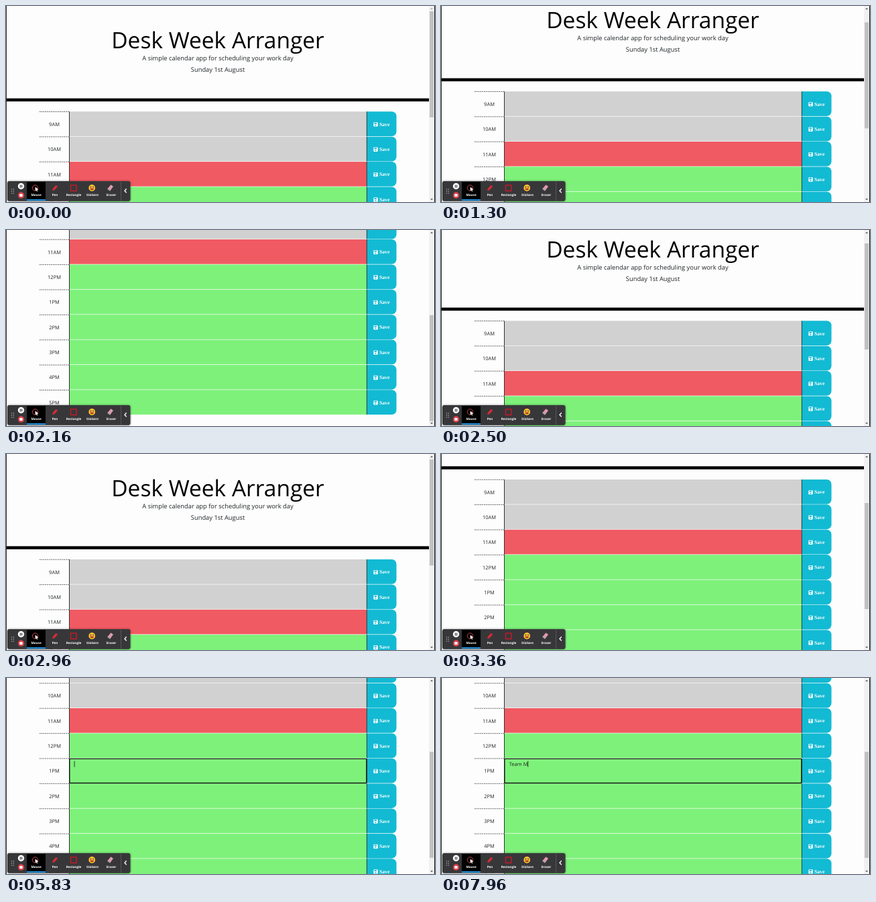
Recreate the animation shown at these times as an HTML page with a canvas. Size 640 px wide and 292 px high, loop 8 s.

```html
<!DOCTYPE html>
<html lang="en">
<head>
<meta charset="utf-8">
<title>Day planner</title>
<style>
html, body { margin: 0; width: 100%; height: 100%; overflow: hidden; background: #fdfdfd; }
canvas { display: block; width: 640px; height: 292px; }
</style>
</head>
<body>
<canvas id="stage" width="640" height="292"></canvas>
<script>
const ctx = document.getElementById('stage').getContext('2d');
ctx.textRendering = 'geometricPrecision';
const LOOP = 8000, FPS = 15;
const SANS = '"Open Sans", sans-serif';
const HOURS = ['9AM', '10AM', '11AM', '12PM', '1PM', '2PM', '3PM', '4PM', '5PM'];
const ROW_TOP = 157.3, ROW_H = 37.37, ACTIVE_ROW = 4;
const GREY = '#d1d1d1', RED = '#f05a62', GREEN = '#7ef17b', CYAN = '#13bad3';
const CLICKS = [[3830, 400], [4560, 460]];

const easeIn = p => p * p;
const easeOut = p => 1 - (1 - p) ** 3;
const linear = p => p;

// Each stop: time, scroll offset, easing used to reach it.
const SCROLL = [
  [0, 0, linear], [433, 0, linear], [1300, 30, easeIn],
  [1567, 182, linear], [2160, 218, easeOut], [2233, 218, linear],
  [2500, 22, linear], [3100, 0, easeOut], [3167, 0, linear],
  [3367, 119.5, linear], [3567, 187, easeOut], [LOOP, 187, linear]
];
const TYPING = [[6500, 'T'], [6700, 'Te'], [6900, 'Tea'], [7100, 'Team'], [7360, 'Team '], [7900, 'Team M']];

function scrollAt(t) {
  const i = Math.max(1, SCROLL.findIndex(stop => stop[0] >= t));
  const [t0, from] = SCROLL[i - 1], [t1, to, ease] = SCROLL[i];
  return from + (to - from) * ease((t - t0) / (t1 - t0));
}

function rect(x, y, w, h, color) {
  ctx.fillStyle = color;
  ctx.fillRect(x, y, w, h);
}

function rounded(x, y, w, h, radius, color) {
  ctx.fillStyle = color;
  ctx.beginPath();
  ctx.roundRect(x, y, w, h, radius);
  ctx.fill();
}

function disc(x, y, r, color) {
  ctx.fillStyle = color;
  ctx.beginPath();
  ctx.arc(x, y, r, 0, 7);
  ctx.fill();
}

function ring(x, y, r, width, color) {
  ctx.strokeStyle = color;
  ctx.lineWidth = width;
  ctx.beginPath();
  ctx.arc(x, y, r, 0, 7);
  ctx.stroke();
}

function poly(points, color) {
  ctx.fillStyle = color;
  ctx.beginPath();
  points.forEach(([x, y]) => ctx.lineTo(x, y));
  ctx.fill();
}

function text(str, x, y, font, color = '#212529', align = 'center') {
  ctx.font = font;
  ctx.fillStyle = color;
  ctx.textAlign = align;
  ctx.fillText(str, x, y);
}

function drawHeader() {
  text('Desk Week Arranger', 316, 63.2, `33.5px ${SANS}`, '#000');
  text('A simple calendar app for scheduling your work day', 316, 81.3, `9.35px ${SANS}`);
  text('Sunday 1st August', 316, 98.3, `9.35px ${SANS}`);
  rect(1, 137.6, 630, 4.6, '#000');
}

function drawSave(y) {
  rounded(538, y, 44.5, ROW_H - 0.6, [0, 7, 7, 0], CYAN);
  const cy = y + ROW_H / 2;
  rounded(548.3, cy - 2.8, 6.4, 6.4, 0.8, '#fff');
  rect(549.4, cy - 2, 3.6, 1.8, CYAN);
  disc(551.5, cy + 1.7, 1, CYAN);
  text('Save', 557, cy + 2.6, 'bold 7.7px "Liberation Serif", serif', '#fff', 'left');
}

function drawRow(hour, i) {
  const y = ROW_TOP + i * ROW_H;
  ctx.strokeStyle = '#222';
  ctx.lineWidth = 0.8;
  ctx.setLineDash([1.6, 1.2]);
  ctx.beginPath();
  ctx.moveTo(50, y + 0.2);
  ctx.lineTo(95, y + 0.2);
  ctx.stroke();
  ctx.setLineDash([]);
  text(hour, 72, y + 21.6, `7.5px ${SANS}`);
  rect(95, y, 443, ROW_H - 0.7, i < 2 ? GREY : i === 2 ? RED : GREEN);
  drawSave(y);
  rect(94, y, 1, ROW_H, '#333');
  rect(537.8, y, 0.8, ROW_H - 0.7, '#222');
}

function drawEntry(t) {
  const y = ROW_TOP + ACTIVE_ROW * ROW_H;
  ctx.strokeStyle = '#10180f';
  ctx.lineWidth = 1.4;
  ctx.beginPath();
  ctx.roundRect(94.8, y + 0.6, 443, ROW_H - 1.2, 1);
  ctx.stroke();
  const typed = TYPING.filter(([at]) => t >= at).pop();
  const str = typed ? typed[1] : '';
  text(str, 101.7, y + 11.3, `7.5px ${SANS}`, '#1a2a1a', 'left');
  const caretOff = (t >= 4960 && t < 5830) || (t >= 6160 && t < 6500);
  if (!caretOff) rect(101.7 + ctx.measureText(str).width, y + 3.8, 0.8, 9, '#111');
}

function drawScrollbar(offset) {
  rect(631, 0, 8, 292, '#f1f1f1');
  rect(632, 8 + offset * 0.545, 6, 158, '#c1c1c1');
  poly([[633, 5], [635, 3], [637, 5]], offset > 0 ? '#505050' : '#a3a3a3');
  poly([[633, 287], [637, 287], [635, 289]], '#505050');
}

function drawTools() {
  ctx.save();
  ctx.shadowColor = 'rgba(0, 0, 0, 0.5)';
  ctx.shadowBlur = 3;
  rounded(2, 261, 183.5, 29.7, 3, '#37373a');
  ctx.restore();
  for (let i = 0; i < 6; i++) disc(8.5 + (i % 2) * 2.8, 273 + (i >> 1) * 3, 0.7, '#bbb');
  disc(22.5, 268.5, 4.7, '#fff');
  rect(20.8, 266.5, 1.2, 4, '#333');
  rect(23, 266.5, 1.2, 4, '#333');
  disc(22.5, 282, 4.7, '#e0434c');
  rounded(20.4, 279.9, 4.2, 4.2, 0.6, '#fff');

  rect(31, 262, 28, 28, '#000');
  rect(31, 288, 28, 2, '#2196e3');
  ring(43.5, 271, 4.2, 1, '#c7404a');
  poly([[43.7, 269.5], [48.5, 273.4], [46.2, 273.8], [47.2, 276], [46.2, 276.4], [45.2, 274.2], [43.7, 275.6]], '#fff');

  poly([[74.8, 266.8], [77, 269], [72, 274.2], [69.3, 275.2], [69.9, 272.2]], '#e52a35');
  ctx.strokeStyle = '#d31924';
  ctx.lineWidth = 1.3;
  ctx.strokeRect(96.5, 267, 8.5, 8.5);

  disc(128.2, 271, 4.9, '#f6bf35');
  disc(126.4, 269.7, 0.9, '#5b3520');
  disc(130, 269.7, 0.9, '#5b3520');
  ctx.fillStyle = '#b7372c';
  ctx.beginPath();
  ctx.arc(128.2, 271.7, 2.6, 0, Math.PI);
  ctx.fill();

  poly([[156.5, 266.3], [160, 269], [155, 275.4], [151.3, 272.6]], '#e59aac');
  poly([[153.3, 270.2], [157, 273], [155, 275.4], [151.3, 272.6]], '#b9a2aa');

  ['Mouse', 'Pen', 'Rectangle', 'Stickers', 'Eraser'].forEach((label, i) =>
    text(label, 45 + i * 28, 283.3, `bold 4.6px ${SANS}`, '#fff'));
  rect(171, 262, 0.8, 28, '#606063');
  ctx.strokeStyle = '#fff';
  ctx.lineWidth = 1.3;
  ctx.beginPath();
  ctx.moveTo(179.8, 272.3);
  ctx.lineTo(177, 275.3);
  ctx.lineTo(179.8, 278.3);
  ctx.stroke();
}

function drawClicks(t) {
  for (const [start, length] of CLICKS) {
    const p = (t - start) / length;
    if (p < 0 || p >= 1) continue;
    ctx.globalAlpha = 1 - p;
    ring(146.5, 142, 15, 1.6, '#b8482f');
    ctx.globalAlpha = 1;
  }
}

function draw(now) {
  const time = now % LOOP;
  const tick = Math.floor((time + 7) * FPS / 1000 - 0.5) + 0.5;
  const t = Math.max(0, tick * 1000 / FPS);
  const offset = scrollAt(t);

  rect(0, 0, 640, 292, '#fdfdfd');
  ctx.save();
  ctx.translate(0, -offset);
  drawHeader();
  HOURS.forEach(drawRow);
  if (t >= 3830) drawEntry(t);
  ctx.restore();
  drawScrollbar(offset);
  rect(0, 0, 1, 292, '#2b2b2b');
  rect(639, 0, 1, 292, '#111');
  drawClicks(t);
  drawTools();
  requestAnimationFrame(frame);
}

let origin;
function frame(now) {
  origin ??= now;
  draw(now - origin);
}
requestAnimationFrame(frame);
</script>
</body>
</html>
```
